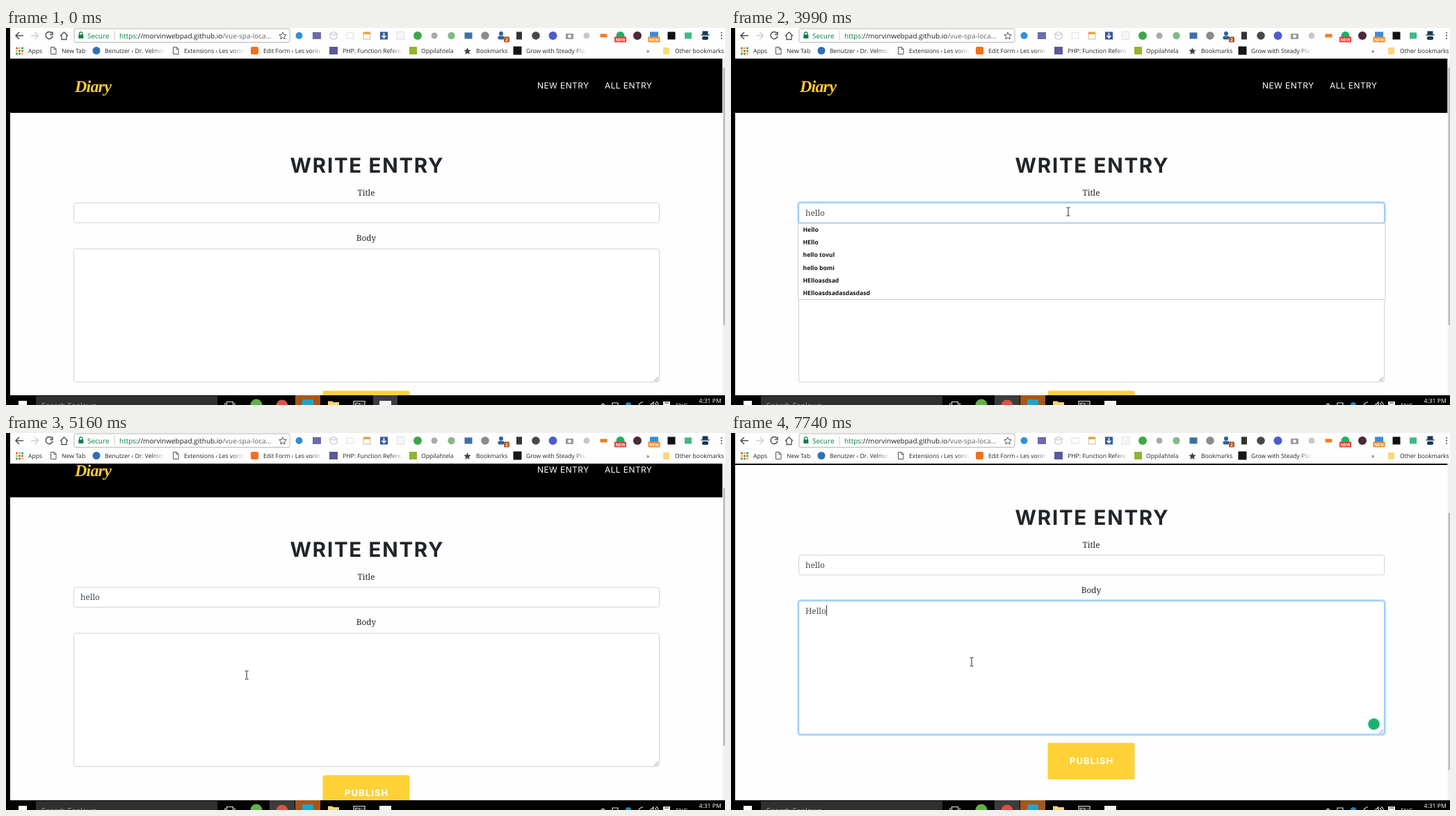
Recreate the animation shown at these times as an HTML page. Size 1034 px wide and 542 px high, loop 8 s.

```html
<!DOCTYPE html>
<html lang="en">
<head>
<meta charset="utf-8">
<title>Diary</title>
<style>
  html, body { margin: 0; width: 100%; height: 100%; overflow: hidden; background: #000; }
  svg { display: block; width: 100%; height: 100%; }
  text { white-space: pre; text-rendering: geometricPrecision; }
  .ui { font: 8.6px "Open Sans", sans-serif; fill: #222; }
  .url { font-size: 10px; }
  .slab { font: 11.8px "Noto Serif", serif; fill: #212529; }
  .field { fill: #495057; }
  .head { font: 700 29.5px Inter, sans-serif; letter-spacing: 1.7px; fill: #212529; }
  .nav { font: 12px Inter, sans-serif; letter-spacing: .4px; fill: #fff; }
  .brand { font: italic 700 24px "Liberation Serif", serif; letter-spacing: -.8px; fill: #fecb33; }
  .btn { font: 700 13px Inter, sans-serif; letter-spacing: 1.1px; fill: #fff; }
  .hint { font-weight: 700; fill: #111; }
  .badge { font: 700 6px "Open Sans", sans-serif; fill: #fff; }
  .mid { text-anchor: middle; }
</style>
</head>
<body>
<svg viewBox="0 0 1034 542" preserveAspectRatio="none">
  <defs>
    <clipPath id="view"><rect x="6" y="44" width="1024.5" height="484"/></clipPath>
    <linearGradient id="fade"><stop offset="0" stop-color="#fefefe" stop-opacity="0"/><stop offset="1" stop-color="#fefefe"/></linearGradient>
  </defs>
  <rect width="1034" height="542"/>
  <rect x="6" y="44" width="1028" height="484" fill="#fefefe"/>

  <g clip-path="url(#view)">
    <g id="page">
      <rect x="6" y="0" width="1025" height="122"/>
      <text class="brand" x="99" y="92">Diary</text>
      <text class="nav" x="764" y="87">NEW ENTRY</text>
      <text class="nav" x="861" y="87">ALL ENTRY</text>
      <text class="head mid" x="519.4" y="208">WRITE ENTRY</text>
      <text class="slab mid" x="518" y="241">Title</text>
      <text class="slab mid" x="518" y="306">Body</text>
      <g id="fields"></g>
      <path d="M932 508l6-6M935.500 508l2.500-2.500" stroke="#777" stroke-width=".9"/>
      <text id="title" class="slab field" x="107" y="270"></text>
      <text id="body" class="slab field" x="107" y="335.500"></text>
      <rect id="caret" width="1" height="15" fill="#333"/>
      <circle id="helper" cx="924.500" cy="494.500" r="8.300" fill="#1cb26b"/>
      <rect x="455.500" y="521.500" width="125" height="52.500" rx="2.500" fill="#fed136"/>
      <text class="btn mid" x="518.600" y="552">PUBLISH</text>
      <g id="list"></g>
    </g>
  </g>
  <rect x="1030.500" y="44" width="3.500" height="484" fill="#f1f1f1"/>
  <rect id="thumb" x="1031.500" width="2.500" height="370" fill="#bcbcbc"/>

  <g id="chrome" class="ui">
    <rect x="6" width="1028" height="44" fill="#fefefe"/>
    <g fill="none" stroke="#505050" stroke-width="1.500">
      <path d="M25 11H14.500M19 6l-5 5 5 5"/>
      <path d="M36 11h10M41.500 6l5 5-5 5" stroke="#d0d0d0"/>
      <path d="M66 7.500a5 5 0 1 0 1 4M67 5.500v4h-4"/>
      <path d="M78 11.500l5.500-5.500 5.500 5.500M80 10.500v6h7v-6" stroke-width="1.300"/>
      <rect x="98" y="1" width="310" height="19.500" rx="2" stroke="#b8b8b8" stroke-width="1"/>
      <path d="M105.500 10V8a2.200 2.200 0 0 1 4.400 0v2" stroke="#0b8043" stroke-width="1.200"/>
      <path d="M156 4v14" stroke="#ccc" stroke-width="1"/>
    </g>
    <rect x="104.300" y="9.500" width="7" height="5.500" fill="#0b8043"/>
    <text class="url" x="117" y="14.500" style="fill:#0b8043">Secure</text>
    <text class="url" x="163" y="14.500"><tspan fill="#0b8043">https</tspan>://morvinwebpad.github.io<tspan fill="#666">/vue-spa-loca...</tspan></text>
    <path id="star" d="M0-5l1.500 3.400 3.700.400-2.800 2.400.800 3.700L0 3l-3.200 1.900.800-3.700-2.800-2.400 3.700-.400z" transform="translate(398 11)" fill="none" stroke="#555"/>
  </g>

  <g id="taskbar">
    <rect y="528" width="1034" height="14" fill="#030303"/>
    <rect x="43" y="529" width="261" height="13" fill="#303030"/>
    <text class="ui" x="51" y="547" style="font-size:11px;fill:#a5a5a5">Search Fenlows</text>
    <rect id="active" y="528" height="14" fill="#3c3c3c"/>
    <rect x="416" y="528" width="36" height="14" fill="#a4571b"/>
    <g fill="none" stroke="#ddd" stroke-width="1.200">
      <path d="M317.500 542v-4.500h9v4.500M315 542v-3M329 542v-3"/>
      <path d="M500 542v-5.500h16v5.500M855.500 542.500l3-2.500 3 2.500"/>
      <path d="M872 542v-3h8v3M910 542q1-3 6-4.500M926 541h2l3-3v4M933 539q2 1 2 3M935 537q3 2 3 5"/>
    </g>
    <rect x="501" y="538" width="14" height="4" fill="#333"/>
    <text class="badge" x="502" y="543">C:\</text>
    <rect x="18" y="536" width="12" height="6" fill="#fff"/>
    <circle cx="360" cy="542" r="8.500" fill="#62b146"/>
    <circle cx="397" cy="543" r="8.500" fill="#dd5144"/>
    <rect x="426" y="534" width="16" height="8" fill="#1fa5c8"/>
    <path d="M463 542v-5.500h6l2 1.500h8v4z" fill="#f6d375"/>
    <rect x="537" y="536" width="17" height="6" fill="#f2f2f2"/>
    <circle cx="895" cy="542" r="4" fill="#2a7dc0"/>
    <path d="M945 542v-5h10v5z" fill="#eee"/>
    <path d="M947 539h6" stroke="#333"/>
    <text class="ui" x="963" y="546" style="fill:#eee">ENG</text>
    <text class="ui" x="996.500" y="539" style="fill:#fff">4:31 PM</text>
  </g>

  <g id="cursor">
    <path id="beam" d="M-2.500-6h2l.5.5.5-.5h2M0-5.500v11M-2.500 6h2l.5-.5.5.5h2" fill="none" stroke="#222"/>
    <path id="arrow" d="M0 0v12l2.800-2.600 1.800 4.100 1.900-.8-1.800-4h3.900z" fill="#fff" stroke="#000" stroke-width=".8"/>
  </g>
</svg>
<script>
const LOOP = 8000, TICK = 77.7;
const $ = id => document.getElementById(id);

function add(parent, tag, attrs, text) {
  const node = document.createElementNS("http://www.w3.org/2000/svg", tag);
  for (const key in attrs) node.setAttribute(key, attrs[key]);
  if (text) node.textContent = text;
  return parent.appendChild(node);
}
const set = (node, attrs) => { for (const key in attrs) node.setAttribute(key, attrs[key]); };
const show = (node, on) => node.setAttribute("visibility", on ? "visible" : "hidden");

// Browser toolbar and bookmarks
const chrome = $("chrome");
const disc = (x, y, r, fill) => add(chrome, "circle", { cx: x, cy: y, r, fill });
const box = (x, y, w, h, fill, more) => add(chrome, "rect", { x: x - w / 2, y: y - h / 2, width: w, height: h, fill, ...more });
const stroke = (d, color, width = 1.2) => add(chrome, "path", { d, fill: "none", stroke: color, "stroke-width": width });
const sheet = (x, y, color) => stroke(`M${x - 3.5} ${y - 5}h5l2.500 2.500v7.500h-7.500zM${x + 1} ${y - 5}v3h3`, color, 1);
const badge = (x, w, label, fill) => {
  box(x, 16.5, w, 8, fill, { rx: 1 });
  add(chrome, "text", { x, y: 18.8, class: "badge mid" }, label);
};

[[421.5, "#2f8fd8", 5], [592, "#3fa648", 6], [616, "#aaa", 4.5], [640.5, "#86b984", 5.2], [689, "#8b8b8b", 5.8],
 [762, "#484848", 5.8], [786.5, "#4c5bd0", 6], [835, "#c8c8c8", 4.5], [883.5, "#1cb26b", 6], [908, "#4b2a35", 6]]
  .forEach(([x, fill, r]) => disc(x, 11, r, fill));
[[447, "#6c6cab", 12, 10], [738, "#333", 8, 11], [859.5, "#f47b20", 10, 5], [932, "#3a8be0", 12, 11],
 [957, "#111", 11, 11], [981, "#41b883", 10, 9], [665, "#3d6fa8", 11, 9], [543.5, "#35599c", 11, 11]]
  .forEach(([x, fill, w, h]) => box(x, 11, w, h, fill));
stroke("M471 5.500l5 2.500v6l-5 2.500-5-2.500v-6zM466 8l5 2.500 5-2.500", "#bbb", 1);
box(495, 11, 10, 8, "none", { stroke: "#ddd" });
box(519, 11, 9.5, 10, "#fff", { stroke: "#d4b58c" });
box(519, 7.5, 10, 3, "#e9a23b");
box(567.5, 11, 11, 11, "none", { stroke: "#ddd" });
stroke("M563 8h9M563 11h9M563 14h9", "#e4e4e4", 1);
stroke("M543.500 7v7M540.500 11l3 3.200 3-3.200", "#fff", 1.6);
disc(712, 8, 3, "#2d5fa0");
box(712, 14, 9, 5, "#2d5fa0", { rx: 2 });
badge(720, 8, "2", "#b5591b");
badge(883.5, 17, "NEW", "#e8382f");
badge(932, 17, "NEW", "#f08a24");
box(810.5, 12, 11, 8, "#999", { rx: 1 });
disc(810.5, 12, 2.4, "#fff");
box(1005.5, 7, 8, 5, "#173a55");
box(1005.5, 10, 12, 1.5, "#173a55");
box(1005.5, 14.5, 9, 5, "#173a55", { rx: 2 });
[7, 11, 15].forEach(y => disc(1029, y, 1.1, "#555"));

const dots = ["#db4437", "#f4b400", "#0f9d58"];
for (let i = 0; i < 9; i++) box(15.5 + i % 3 * 4, 29 + (i / 3 | 0) * 4, 2.6, 2.6, dots[(i + (i / 3 | 0)) % 3]);
sheet(68, 32.5, "#555");
disc(130, 32.5, 5.5, "#2f6fb5");
sheet(244, 32.5, "#555");
box(357.5, 32.5, 11, 11, "#f2711c", { rx: 2 });
box(471, 32.5, 12, 11, "#5a5a9c");
box(585.5, 32.5, 11, 11, "#8fb530");
add(chrome, "path", { d: $("star").getAttribute("d"), transform: "translate(663.500 33)", fill: "#444" });
box(735.5, 32.5, 12, 12, "#151515");
box(949.5, 33, 9, 10, "#fbd67b", { rx: 1 });

[[32, "Apps"], [80, "New Tab"], [142, "Benutzer ‹ Dr. Velmor", 1], [256, "Extensions ‹ Les vorin", 1],
 [370, "Edit Form ‹ Les vorin", 1], [484, "PHP: Function Refere", 1], [597, "Oppilahtela"],
 [676, "Bookmarks"], [748, "Grow with Steady Plan", 1], [921, "»"], [962, "Other bookmarks"]]
  .forEach(([x, label, cut]) => {
    add(chrome, "text", { x, y: 36 }, label);
    if (!cut) return;
    add(chrome, "rect", { x: x + 68, y: 26, width: 19, height: 14, fill: "url(#fade)" });
    box(x + 91, 33, 8, 14, "#fefefe");
  });

// Form fields with a focus ring
function field(y, height) {
  const size = { x: 97.5, y, width: 842, height, rx: 2.8 };
  const ring = add($("fields"), "rect", { ...size, fill: "none", stroke: "#bfdeff", "stroke-width": 5 });
  const base = add($("fields"), "rect", { ...size, fill: "#fff" });
  return focus => {
    ring.setAttribute("opacity", focus);
    const mix = (a, b) => Math.round(a + (b - a) * focus);
    base.setAttribute("stroke", `rgb(${mix(206, 128)},${mix(212, 189)},${mix(218, 255)})`);
  };
}
const focusTitle = field(251.5, 28.5), focusBody = field(317.5, 191.5);

// Suggestions
const list = $("list");
add(list, "rect", { x: 96.5, y: 281, width: 844.5, height: 109.5, fill: "#fff", stroke: "#cfcfcf" });
const rows = Array.from({ length: 6 }, (_, i) => add(list, "text", { x: 103.5, y: 293 + i * 18.2, class: "ui hint" }));
const history = ["Hello", "HEllo", "hamama", "hello tovul", "hello bomi", "HElloasdsad", "HElloasdsadasdasdasd"];

// Timeline
const starts = [0, 320, 1510, 4370, 5250, 5640];
const scrollKeys = [[5000, 0], [5070, 3], [5160, 34], [5250, 74], [5480, 76]];
const titleKeys = [2490, 2740, 3120, 3270, 3510], bodyKeys = [6560, 7020, 7340, 7510, 7740];
const clamp = v => Math.max(0, Math.min(1, v));
const ramp = (t, a, b) => clamp((t - a) / (b - a));
const ease = v => v * v * (3 - 2 * v);
const between = (t, a, b) => t >= a && t < b;
const typed = (word, keys, t) => word.slice(0, keys.filter(k => t >= k).length);

function snap(t) {
  const from = starts.filter(s => s <= t).pop();
  return from + Math.floor((t - from) / TICK) * TICK;
}
function follow(keys, t) {
  let v = keys[0][1];
  for (let i = 1; i < keys.length; i++)
    v += (keys[i][1] - keys[i - 1][1]) * ramp(t, keys[i - 1][0], keys[i][0]);
  return v;
}
function pointer(s) {
  const enter = ease(ramp(s, 320, 1095)), down = ease(ramp(s, 4292, 5060));
  const drift = ramp(s, 5070, 5250), up = ease(ramp(s, 5250, 5480));
  return [954 - 469 * enter - 138 * down - 2 * drift + up, 530 - 266 * enter + 84 * down - 19 * up];
}

function draw(t) {
  const s = snap(t), scroll = follow(scrollKeys, s);
  $("page").setAttribute("transform", `translate(0 ${-scroll})`);
  $("thumb").setAttribute("y", 57 + scroll * 0.76);

  focusTitle(ramp(s, 1440, 1660) * (1 - ramp(s, 4700, 4850)));
  focusBody(ramp(s, 5565, 5790));
  show($("helper"), s >= 5700);

  const title = $("title"), body = $("body");
  title.textContent = typed("hello", titleKeys, t);
  body.textContent = typed("Hello", bodyKeys, t);

  const inTitle = between(t, 1510, 1960) || between(t, 2490, 3990);
  const inBody = between(t, 5640, 6100) || t >= 6560;
  show($("caret"), inTitle || inBody);
  const entry = inBody ? body : title;
  const width = entry.textContent ? entry.getComputedTextLength() : 0;
  set($("caret"), { x: Math.round(107 + width), y: inBody ? 323.5 : 257.5 });

  const open = t >= 2570 && s < 4740;
  show(list, open);
  const prefix = t < 2810 ? "h" : "he";
  const hits = history.filter(h => h.toLowerCase().startsWith(prefix));
  rows.forEach((row, i) => row.textContent = hits[i]);

  set($("active"), t < 1510 ? { x: 528, width: 35 } : { x: 379, width: 36 });

  const [x, y] = pointer(s), py = y + scroll;
  const inside = x > 97 && x < 940;
  const beam = inside && (between(py, 251, 280) || (between(py, 317, 509) && !(open && y < 390)));
  $("cursor").setAttribute("transform", `translate(${x} ${y})`);
  show($("beam"), t >= 320 && beam);
  show($("arrow"), t >= 320 && !beam);
}

const begin = performance.now();
function loop() {
  draw((performance.now() - begin) % LOOP);
  requestAnimationFrame(loop);
}
loop();
</script>
</body>
</html>
```
